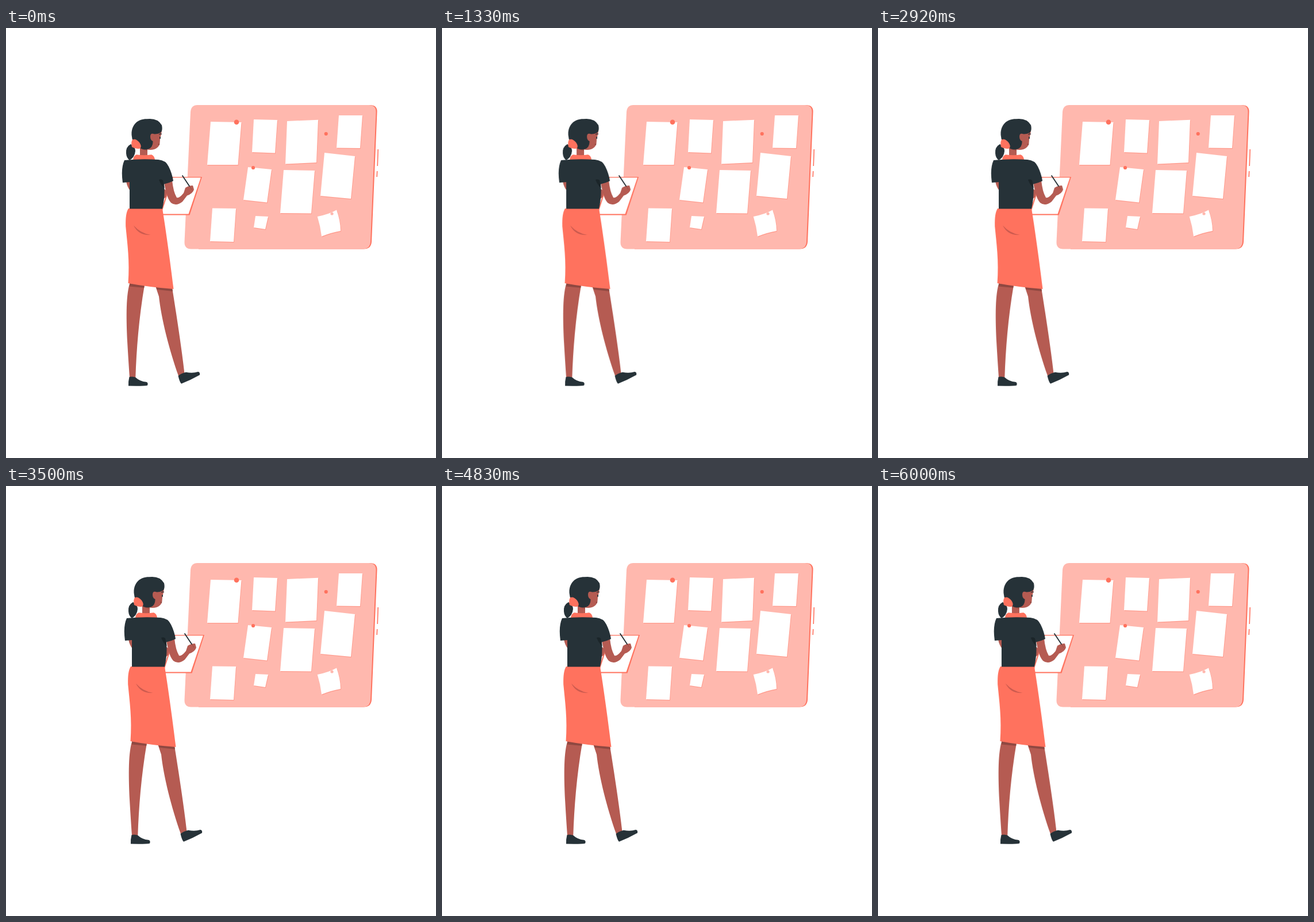
These frames come from a looping animation (748x748 px, 6040 ms). An HTML page:

```html
<!DOCTYPE html>
<html lang="en">
<head>
<meta charset="utf-8">
<title>Planning board</title>
<style>
  html, body { margin: 0; width: 100%; height: 100%; overflow: hidden; background: #fff; }
  svg { display: block; width: 748px; height: 748px; }
  .coral { fill: #ff725e; }
  .pale { fill: #ffb8ae; }
  .dark { fill: #263238; }
  .skin { fill: #b55b52; }
  .shade { fill: #8f4841; }
  .fold { fill: #cc5b4f; }
  .crease { fill: #1b2529; }
  .white { fill: #fff; }
  .line { fill: none; stroke: #ff725e; stroke-width: 1.6; }
  .pen { fill: none; stroke: #263238; stroke-width: 1.9; stroke-linecap: round; }
  .brow { fill: none; stroke: #263238; stroke-width: 1.2; stroke-linecap: round; }
  .edge { fill: #ff9b8d; }
</style>
</head>
<body>
<svg viewBox="0 0 748 748">
  <g id="board">
    <path class="coral" d="M335 134H633Q646.500 134 645.500 147L636 372Q635 384.500 622 384.500H335Z"/>
    <path class="pale" d="M333 134H631Q644 134 643.500 147L634 372Q633 384.500 620 384.500H322Q310 384 310.500 372L321 146Q322 134 333 134Z"/>
    <path class="line" d="M647.200 211L646.200 240M645.700 249L645.200 259"/>
  </g>
  <g id="notes"></g>
  <g id="pins">
    <circle class="coral" cx="401" cy="163.700" r="4.300"/>
    <circle class="coral" cx="556.700" cy="184" r="3.100"/>
    <circle class="coral" cx="430" cy="243" r="3.100"/>
    <circle class="pale" cx="567" cy="323" r="2.600"/>
  </g>

  <g id="woman">
    <!-- clipboard -->
    <path class="coral" d="M289 259H341L319.500 325.500H267Z"/>
    <path class="white" d="M290.500 260.300H338.800L317.500 323.500H270Z"/>
    <path class="skin" d="M273 279L280 283L278.500 294L273 298Z"/>

    <!-- legs and shoes -->
    <path class="skin" d="M215 445C208 468 209.500 512 211 545Q213 580 215 608H225.300C227 560 231 505 241 447Z"/>
    <path class="skin" d="M260 449L266 467C270 505 284 560 300 605L310.500 601C306 560 296 495 289 452Z"/>
    <path class="shade" d="M215 444L241 447L240.200 452L215 449.500ZM260 449L289 452L290 458L263 455Z"/>
    <path class="dark" d="M214.500 607Q219 606 225 607.500Q233 615 244 615.700Q248 617 246 621.700Q240 623 213 622.500Q212.500 615 214.500 607Z"/>
    <path class="dark" d="M299.500 605Q306 600 313 598.700Q325 601 334 598Q338 598.500 337 603.500Q322 612 305 618.800Q302 616 299.500 605Z"/>

    <!-- skirt -->
    <path class="coral" d="M213 314H272C277 345 285 400 291.500 454Q250 451 212.500 444C215.500 405 211 375 208.200 345Q207.500 322 213 314Z"/>
    <path class="fold" d="M222 343.500Q234 357 251.500 360Q231 361.500 222 343.500Z"/>

    <!-- head -->
    <path class="dark" d="M217 202Q208 207 209 218Q209.500 226 215 230Q224 225 225 214Q225 207 217 202Z"/>
    <path class="skin" d="M233 206H246V223H233Z"/>
    <path class="shade" d="M235 210H246V213Q240 213 235 210Z"/>
    <path class="skin" d="M246 184L271 178Q270.500 185 268 193Q267.800 199 267 203Q264 209 258 211Q251 213 244 211Z"/>
    <path class="dark" d="M218.500 186C218 168 229 158 245 158.200Q264 156 271 169Q273 178 269 182Q263 185 258 184.500Q251 182 251 189Q251 195 255.500 197Q256 207 248 210.500Q239 213 232 208Q219 200 218.500 186Z"/>
    <ellipse class="dark" cx="268" cy="191" rx="1" ry="1.900"/>
    <path class="brow" d="M266.500 185Q269 183.500 270.500 184.500"/>
    <path class="shade" d="M264 202L267.300 201L266.700 204Z"/>
    <path class="coral" d="M220 194Q226 191.500 232 199Q237 206 233 209.500Q227 211.500 219 207Q217 199 220 194Z"/>
    <path class="coral" d="M221 229Q222 222 227 220.300Q240 222 253 220.300Q258 222 259 229Z"/>

    <!-- arms and blouse -->
    <path class="skin" d="M209 267H216V283Q211 277 209 267Z"/>
    <path class="skin" d="M275 269C278 284 280 296 287 304Q296 311 307 302L315 291.500Q325 288 327 281L325 274Q318 274 312 278L309 287Q301 297 297 295Q291 285 289 265Z"/>
    <path class="pen" d="M307 257L319 275"/>
    <path class="brow" d="M320 276L323 281" style="stroke:#8f4841;stroke-width:.8"/>
    <path class="dark" d="M206 230Q235 227 265 229Q278 230 283 241Q289 253 291 266Q283 270 275 271.500Q277 292 272 314.500H215V268L203 269Q199.500 244 206 230Z"/>
    <path class="crease" d="M266 264Q270 262 273 265L275.500 278Q270 274 266 264Z"/>
  </g>
</svg>
<script>
  const SVG = "http://www.w3.org/2000/svg";
  const LOOP = 6040;

  const sheets = [
    "M356 163L409.500 164L403.500 238L350 238Z",
    "M431 159L472 160L468 217.500L428 216Z",
    "M489 162L543 159.700L540 234L486 236.500Z",
    "M579 152L620 152L616 209L575 208.500Z",
    "M421 242L462 246L454 303.500L413 299Z",
    "M483 247L537 248L531 322.500L477 322Z",
    "M554 217L607 223L600 297L547 292Z",
    "M359 313.500L400 314L396 372L355 371Z",
    "M434 327L456 328L451 350L431 347Z",
    "M541.700 328Q562 324 575 316.500Q582 336 582 353Q565 356 549 362.500Q547 345 541.700 328Z"
  ];

  function addPath(parent, d, name, shift) {
    const path = document.createElementNS(SVG, "path");
    path.setAttribute("d", d);
    path.setAttribute("class", name);
    if (shift) path.setAttribute("transform", `translate(${shift})`);
    parent.append(path);
  }

  const notes = document.getElementById("notes");
  for (const d of sheets) {
    addPath(notes, d, "edge", "0.8 1.3");
    addPath(notes, d, "white");
  }

  // Side-to-side sway: [time in ms, offset in px]
  const sway = [
    [0, 0], [604, -1.5], [1208, 3], [1785, -6], [2385, 6], [2970, -6],
    [3610, 6], [4220, -6], [4832, 3], [5436, -1.5], [LOOP, 0]
  ];
  document.getElementById("woman").animate(
    sway.map(([time, x]) => ({ offset: time / LOOP, transform: `translateX(${x}px)` })),
    { duration: LOOP, iterations: Infinity, easing: "linear" }
  );
</script>
</body>
</html>
```
